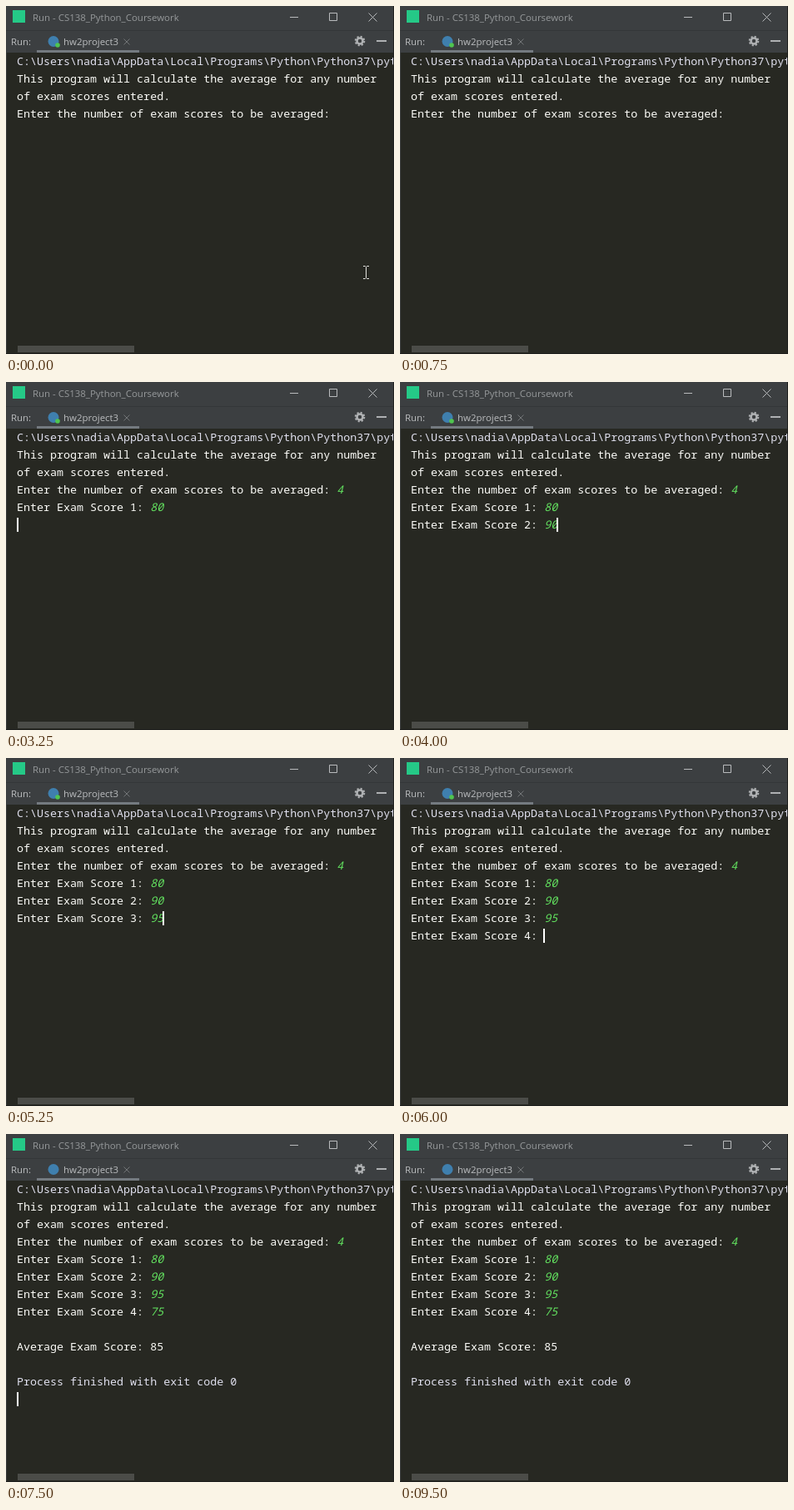
Animation of 466x418 px, one loop 10000 ms. Source, as an HTML page:

```html
<!DOCTYPE html>
<html lang="en">
<head>
<meta charset="utf-8">
<title>Console run</title>
<style>
  html, body { margin: 0; width: 100%; height: 100%; overflow: hidden; background: #272822; }
  svg { display: block; }
  text { white-space: pre; }
  .ui { font: 11.45px "Open Sans", "Noto Sans", sans-serif; fill: #bbbdbf; }
  .console { font: 500 13.35px "Noto Sans Mono", "DejaVu Sans Mono", monospace; fill: #fcfcf8; }
  .console .system { fill: #e0e0ee; }
  .console .input { fill: #62e05f; font-style: italic; }
  .line { fill: none; stroke: #b9bbbd; }
</style>
</head>
<body>
<svg width="466" height="418" viewBox="0 0 466 418">
  <rect width="466" height="418" fill="#272822"/>
  <rect width="466" height="56" fill="#3c3f41"/>
  <rect y="29" width="466" height="1" fill="#333638"/>

  <rect x="8" y="5" width="15" height="15" fill="#25c987"/>
  <text class="ui" x="32" y="18" style="fill:#96999b">Run - CS138_Python_Coursework</text>
  <path class="line" d="M341 13.5h10M388.5 8.5h9v9h-9zM435.5 8.5l10 10m0-10l-10 10"/>

  <rect x="37" y="53" width="123" height="3" fill="#747a80"/>
  <text class="ui" x="6" y="47">Run:</text>
  <circle cx="57" cy="42.5" r="6.5" fill="#3f7fae"/>
  <circle id="running" cx="62" cy="47" r="2.8" fill="#4fc54f"/>
  <text class="ui" x="69" y="47">hw2project3</text>
  <path class="line" d="M141.5 39.5l7 7m0-7l-7 7" style="stroke:#727577"/>
  <g class="line" style="stroke:#afb1b3">
    <circle cx="425" cy="42" r="3.5" stroke-width="2.6"/>
    <circle cx="425" cy="42" r="5.3" stroke-width="2" stroke-dasharray="2.1 2.063"/>
    <path d="M445 42h12" stroke-width="2"/>
  </g>

  <g id="console" class="console"></g>
  <rect id="caret" width="2" height="17" fill="#fff"/>
  <rect x="14" y="408" width="140" height="8" fill="#4b4c48"/>
  <path d="M.5 56v361" stroke="#3a3c3c"/>
  <path d="M0 417.5h465.5V0" fill="none" stroke="#1e1f1d"/>
  <path id="pointer" class="line" style="stroke:#e4e4e0"
    d="M0 .5h2.5l1 1 1-1H7M3.5 1.5v13M0 15.5h2.5l1-1 1 1H7"/>
</svg>
<script>
const LOOP = 10000, LEFT = 13, TOP = 58, PITCH = 21, ADVANCE = 7.98;
const $ = id => document.getElementById(id);
const prompt = n => `Enter Exam Score ${n}: `;

const intro = [
  "~C:\\Users\\nadia\\AppData\\Local\\Programs\\Python\\Python37\\python.exe",
  "This program will calculate the average for any number",
  "of exam scores entered.",
  "Enter the number of exam scores to be averaged: "
].join("\n");

// [time, appended output, caret]; "~" starts a system line, "#" a typed digit
const steps = [
  [0, intro, false],
  [1000, "", true],
  [1500, "#4", true],
  [2000, "\n", true],
  [2250, prompt(1), true],
  [2750, "#8", true],
  [3000, "#0", true],
  [3250, "\n", true],
  [3500, prompt(2), true],
  [3750, "#9", true],
  [4000, "#0", true],
  [4500, "\n" + prompt(3), true],
  [5250, "#9#5", true],
  [5750, "\n", true],
  [6000, prompt(4), true],
  [6250, "#7", true],
  [6500, "#5", true],
  [7250, "\n", true],
  [7500, "\nAverage Exam Score: 85\n\n~Process finished with exit code 0\n", true],
  [8500, "", false],
  [9000, "", true],
  [9500, "", false]
];

function addSvg(parent, tag, attrs, text = "") {
  const el = document.createElementNS("http://www.w3.org/2000/svg", tag);
  for (const key in attrs) el.setAttribute(key, attrs[key]);
  el.textContent = text;
  return parent.appendChild(el);
}

function drawRow(row, index) {
  const text = addSvg($("console"), "text", { x: LEFT, y: TOP + PITCH * index + 13 });
  if (row[0] === "~") text.setAttribute("class", "system");
  const [, output, typed] = row.match(/^~?([^#]*)(.*)$/);
  addSvg(text, "tspan", {}, output);
  addSvg(text, "tspan", { class: "input" }, typed.replace(/#/g, ""));
}

function drawStep(index) {
  const rows = steps.slice(0, index + 1).map(step => step[1]).join("").split("\n");
  $("console").replaceChildren();
  rows.forEach(drawRow);
  const column = rows[rows.length - 1].replace(/[~#]/g, "").length;
  $("caret").setAttribute("x", Math.floor(LEFT + ADVANCE * column));
  $("caret").setAttribute("y", TOP + PITCH * (rows.length - 1));
  $("caret").style.display = steps[index][2] ? "" : "none";
}

let shown = -1;
function render(t) {
  const index = steps.filter(step => step[0] <= t).length - 1;
  if (index !== shown) drawStep(shown = index);
  $("running").style.display = t < 7250 ? "" : "none";
  $("pointer").style.display = t < 750 ? "" : "none";
  $("pointer").setAttribute("transform", t < 250 ? "translate(429 312)" : "translate(441 318)");
}

const start = performance.now();
function frame() {
  render((performance.now() - start) % LOOP);
  requestAnimationFrame(frame);
}
frame();
</script>
</body>
</html>
```
